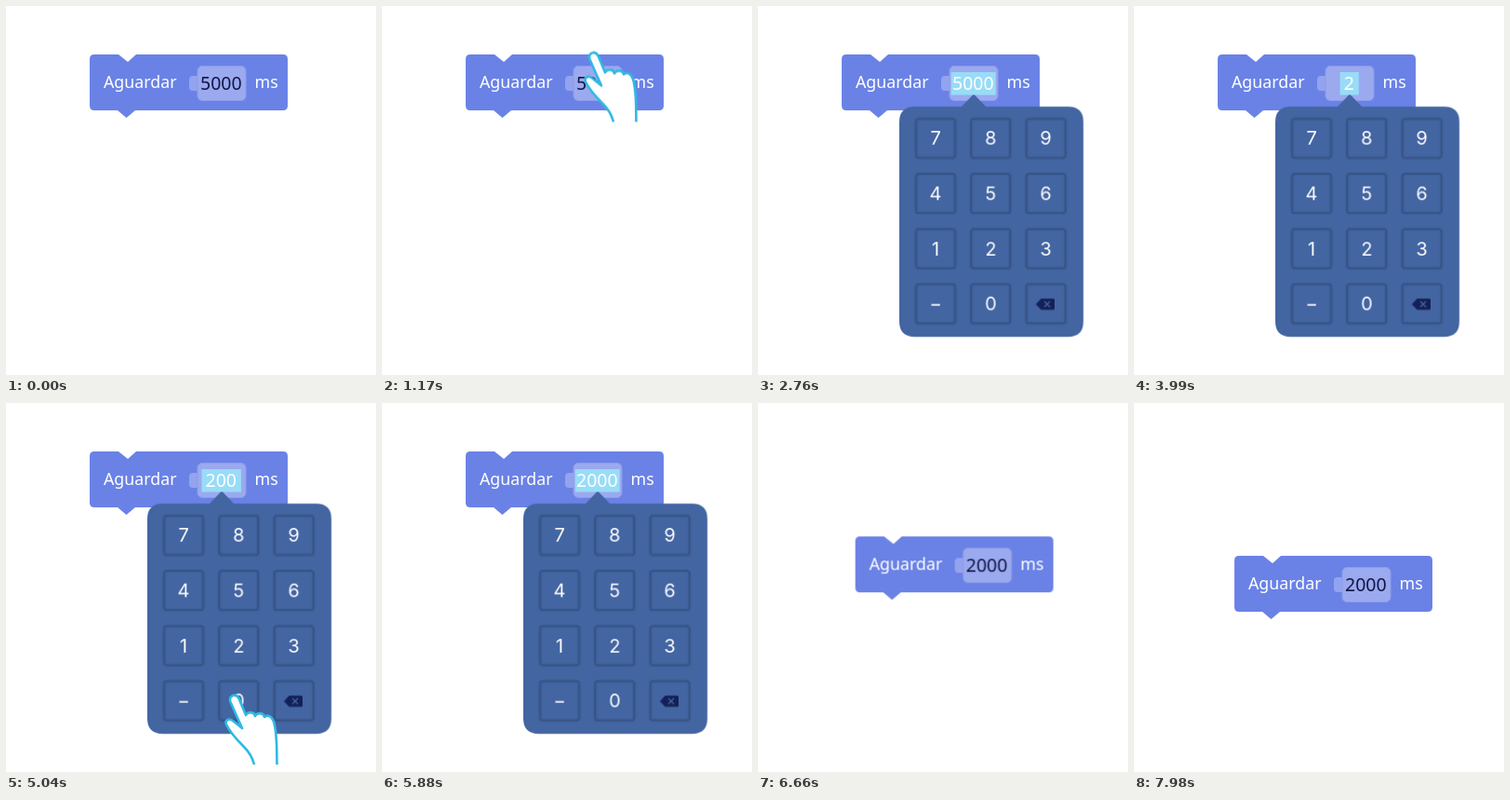
These frames come from a looping animation (398 px wide and 396 px high, 8 s). An HTML page:

```html
<!DOCTYPE html>
<html lang="pt">
<head>
<meta charset="utf-8">
<title>Aguardar</title>
<style>
  html, body { margin: 0; width: 100%; height: 100%; overflow: hidden; background: #fff; }
  svg { display: block; width: 100%; height: 100%; }
  text { font-family: "Noto Sans", sans-serif; fill: #fff; }
  .label { font-size: 17.8px; }
  .value { font-size: 19.5px; text-anchor: middle; }
  .idle { fill: #101644; }
  .key text { font-family: Inter, sans-serif; font-size: 20px; text-anchor: middle; }
  .key rect { fill: none; stroke: #34517f; }
  #popup { transform-origin: 232px 95px; }
  #popup, #hand, .value, .picked { opacity: 0; }
</style>
</head>
<body>
<svg viewBox="0 0 398 396">
  <g id="block">
    <path fill="#6a82e6" d="M95 52H121L131 60L140 52H298Q303 52 303 57V107Q303 112 298 112H139L129.500 120L120 112H95Q90 112 90 107V57Q90 52 95 52Z"/>
    <rect x="197" y="75" width="12" height="16" rx="4" fill="#94a3ee"/>
    <rect x="206" y="64.500" width="52" height="37" rx="5" fill="#9ba9ef" stroke="#8d9ceb"/>
    <text class="label" x="105" y="88">Aguardar</text>
    <text class="label" x="267.500" y="88">ms</text>
    <g id="values"></g>
  </g>
  <g id="popup">
    <path fill="#4365a2" d="M168 108H219L230 96.500Q232 94 234 96.500L245 108H333.500Q350 108 350 124.500V338.500Q350 355 333.500 355H168.500Q152 355 152 338.500V124.500Q152 108 168.500 108Z"/>
    <g id="keys"></g>
    <path fill="#142058" d="M299 320L304.500 314H317.500Q319 314 319 315.500V324.500Q319 326 317.500 326H304.500Z"/>
    <path stroke="#4365a2" stroke-width="1.300" d="M308 317L314 323M314 317L308 323"/>
  </g>
  <path id="hand" fill="#fff" stroke="#2fb9e3" stroke-width="2.600" stroke-linejoin="round"
    d="M267 388C265 380 262 375 256 369C249 362 241 354 237 345C235 340 240 338 244 341L254 349L241.500 321C239 314 247 311 250.500 317L258 335C260 331 267 331 268 336C270 332 277 332 278 337C281 334 286 336 288 342C292 355 291 372 291.500 388"/>
</svg>
<script>
  const LOOP = 8000;
  const svgNS = "http://www.w3.org/2000/svg";
  const $ = id => document.getElementById(id);

  function add(parent, tag, attrs, text) {
    const el = document.createElementNS(svgNS, tag);
    for (const name in attrs) el.setAttribute(name, attrs[name]);
    if (text) el.textContent = text;
    return parent.appendChild(el);
  }

  // points: [ms, value, easing to the next point]
  function track(el, prop, points) {
    const all = [[0, points[0][1]], ...points, [LOOP, points.at(-1)[1]]];
    el.animate(all.map(([ms, value, easing = "linear"]) =>
      ({ offset: ms / LOOP, [prop]: value, easing })),
      { duration: LOOP, iterations: Infinity });
  }

  const shift = (x, y) => `translate(${x}px, ${y}px)`;

  ["789", "456", "123", "−0 "].forEach((row, r) => [...row].forEach((char, c) => {
    const x = 191 + c * 59.3, y = 142 + r * 59.2;
    const key = add($("keys"), "g", { class: "key" });
    const box = { x: x - 21, y: y - 21, width: 42, height: 42, rx: 3 };
    add(key, "rect", { ...box, "stroke-width": 4, "stroke-opacity": .25 });
    add(key, "rect", { ...box, "stroke-width": 1.7, "stroke-opacity": .8 });
    if (char !== " ") add(key, "text", { x, y: y + 7.2 }, char);
  }));

  function idleValue(value, points) {
    const el = add($("values"), "text", { class: "value idle", x: 231.3, y: 90 }, value);
    track(el, "opacity", points);
  }

  function pickedValue(value, points) {
    const group = add($("values"), "g", { class: "picked" });
    const width = Math.min(value.length * 11.15 + 9, 48);
    add(group, "rect", { x: 231.7 - width / 2, y: 71, width, height: 24.5, fill: "#98dcf7" });
    const text = add(group, "text", { class: "value", x: 231.3, y: 90 }, value);
    text.style.opacity = 1;
    track(group, "opacity", points);
  }

  const taps = [3300, 4480, 4950, 5400];
  const during = (from, to) => [[from, 0], [from, 1], [to, 1], [to, 0]];

  idleValue("5000", [[1760, 1], [1960, 0]]);
  pickedValue("5000", [[1760, 0], [1960, 1], [taps[0], 1], [taps[0], 0]]);
  pickedValue("2", during(taps[0], taps[1]));
  pickedValue("20", during(taps[1], taps[2]));
  pickedValue("200", during(taps[2], taps[3]));
  pickedValue("2000", [[taps[3], 0], [taps[3], 1], [5950, 1], [6217, 0]]);
  idleValue("2000", [[5950, 0], [6217, 1]]);

  track($("popup"), "opacity", [[1800, 0], [2080, 1], [5950, 1], [6217, 0]]);
  track($("popup"), "transform", [
    [1800, "scale(.9)"], [2080, "scale(1.024)", "ease-in-out"], [2260, "scale(1)"]
  ]);

  track($("hand"), "opacity", [
    [500, 0], [750, 1], [1860, 1], [2100, 0],
    [2850, 0], [3050, 1], [3500, 1], [3750, 0],
    [4090, 0], [4290, 1], [5520, 1], [5750, 0]
  ]);
  track($("hand"), "transform", [
    [700, shift(-18, -209), "ease-in-out"], [1250, shift(-18, -266), "ease-in-out"],
    [1550, shift(-18, -236)], [2400, shift(-18, -236)],
    [2400, shift(0, -65)], [3100, shift(0, -65), "ease-in-out"],
    [taps[0], shift(0, -59)], [3900, shift(0, -59)],
    [3900, shift(0, -6)], [4300, shift(0, -6), "ease-in-out"],
    [taps[1], shift(0, 0), "ease-in-out"], [4700, shift(0, -6), "ease-in-out"],
    [taps[2], shift(0, 0)], [5060, shift(0, 0), "ease-in-out"],
    [5230, shift(0, -6), "ease-in-out"], [taps[3], shift(0, 0)]
  ]);

  track($("block"), "transform", [
    [6240, shift(0, 0), "ease-in-out"], [6840, shift(18, 112)]
  ]);
</script>
</body>
</html>
```
